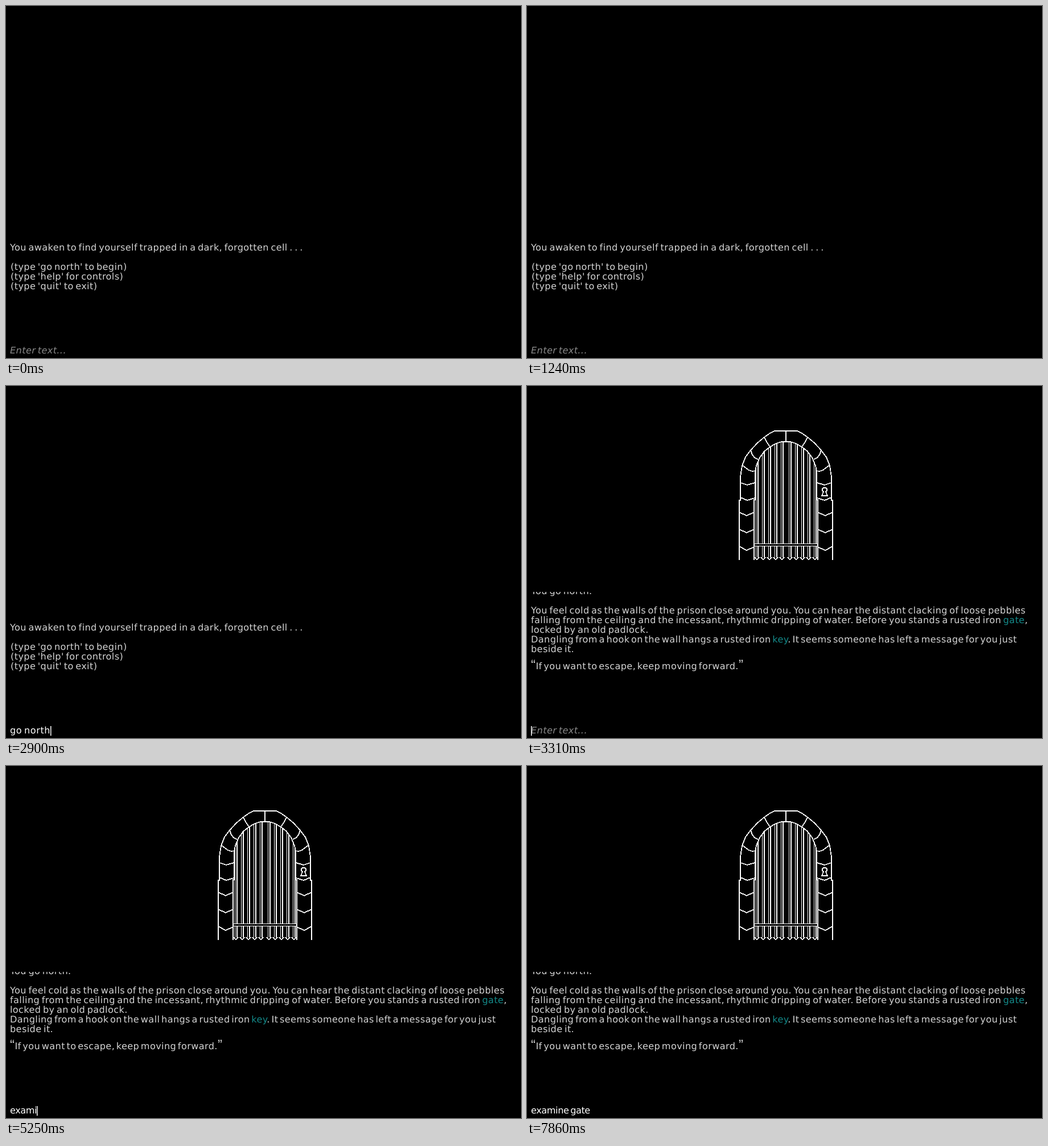
Animation of 905 by 619 pixels, one loop 8 s. Source, as an HTML page:

```html
<!DOCTYPE html>
<html lang="en">
<head>
<meta charset="utf-8">
<title>Text adventure</title>
<style>
  html, body { margin: 0; width: 100%; height: 100%; overflow: hidden; background: #000; }
  svg { display: block; width: 905px; height: 619px; }
  text {
    font: 16.1px "DejaVu Sans", sans-serif;
    letter-spacing: 0.4px;
    word-spacing: -2px;
    fill: #d4d4d4;
    white-space: pre;
    text-rendering: geometricPrecision;
  }
  .link { fill: #148a8a; }
  .quote { font: 24px "Liberation Sans", sans-serif; }
  .tight { word-spacing: -2.85px; }
  #hint { font-style: italic; fill: #8a8a8a; }
  #input { fill: #fff; }
  #door { fill: none; stroke: #fff; stroke-width: 1.8; shape-rendering: crispEdges; }
</style>
</head>
<body>
<svg viewBox="0 0 905 619">
  <defs>
    <clipPath id="pane"><rect y="362" width="905" height="200"/></clipPath>
    <clipPath id="opening">
      <path d="M399 310V200L401 150L403 140L409 126L417 115L427 107L438 101L447 98H463L472 101L483 107L493 115L501 126L507 140L509 150L511 200V310Z"/>
    </clipPath>
    <g id="side">
      <path d="M373 306V201H375V160L378 140L384 125L393 113L405 100L417 90L427 83L435 79H455"/>
      <path d="M399 306V200H401V150L403 140L409 126L417 115L427 107L438 101L447 98H455"/>
      <path d="M417 90L421 98L427 107M393 113L396 121L400 126L406 129M378 139L390 148L396 150L402 149"/>
      <path d="M375 170L387 174L401 170M375 196L387 201L400 197"/>
      <path d="M373 222L386 228L399 222M373 252L386 258L399 252M373 282L386 289L399 283"/>
    </g>
  </defs>

  <g id="intro">
    <text x="7" y="430">You awaken to find yourself trapped in a dark, forgotten cell . . .</text>
    <text x="8" y="464">(type 'go north' to begin)</text>
    <text x="8" y="481">(type 'help' for controls)</text>
    <text x="8" y="498">(type 'quit' to exit)</text>
  </g>

  <g id="room">
    <g id="door">
      <use href="#side"/>
      <use href="#side" transform="translate(910) scale(-1 1)"/>
      <path d="M455 79V98M399 277.5H511M399 281.5H511"/>
      <path id="bars" clip-path="url(#opening)"/>
      <path id="tips"/>
      <path d="M521 186L519 184V181L521 179H525L527 181V184L525 186L528 193H518Z"/>
    </g>
    <g clip-path="url(#pane)">
      <text x="7" y="366">You go north.</text>
      <text x="7" y="400">You feel cold as the walls of the prison close around you. You can hear the distant clacking of loose pebbles</text>
      <text x="7" y="417">falling from the ceiling and the incessant, rhythmic dripping of water. Before you stands a rusted iron <tspan class="link">gate</tspan>,</text>
      <text x="7" y="434">locked by an old padlock.</text>
      <text x="7" y="451" class="tight">Dangling from a hook on the wall hangs a rusted iron <tspan class="link">key</tspan>. It seems someone has left a message for you just</text>
      <text x="7" y="468">beside it.</text>
      <text x="7" y="498" class="tight"><tspan class="quote">“</tspan>If you want to escape, keep moving forward.<tspan class="quote">”</tspan></text>
    </g>
  </g>

  <text id="hint" x="7" y="611">Enter text...</text>
  <text id="input" x="7" y="611"></text>
  <rect id="caret" y="598" width="1.5" height="17" fill="#fff"/>
</svg>
<script>
const LOOP = 8000;
const ENTER = 3310;
const LEFT = 7;
const first = {
  text: 'go north', track: '0.6px',
  keys: [1930, 2060, 2340, 2440, 2620, 2710, 2800, 2900]
};
const second = {
  text: 'examine gate', track: '-0.4px',
  keys: [4610, 4790, 4970, 5070, 5250, 5400, 5480, 5550, 5630, 5710, 5910, 6140]
};
const caretOn = [[1830, 3920], [4510, 6740], [7300, 7860]];

const $ = id => document.getElementById(id);
const show = (el, on) => el.setAttribute('visibility', on ? 'visible' : 'hidden');

// Five spear-tipped bars on each side of the middle gap.
let bars = '', tips = '';
for (const start of [404, 462]) {
  for (let i = 0; i < 5; i++) {
    const x = start + i * 11;
    bars += `M${x - 1.5} 90V277M${x + 2} 90V277M${x - 1.5} 282V301M${x + 2} 282V301`;
    tips += `M${x - 4} 301L${x} 305.5L${x + 4} 301`;
  }
}
$('bars').setAttribute('d', bars);
$('tips').setAttribute('d', tips);

const input = $('input');

function draw(t) {
  const inRoom = t >= ENTER;
  show($('intro'), !inRoom);
  show($('room'), inRoom);

  const entry = inRoom ? second : first;
  const typed = entry.text.slice(0, entry.keys.filter(k => k <= t).length);
  if (input.textContent !== typed) input.textContent = typed;
  input.style.letterSpacing = entry.track;
  show($('hint'), !typed);

  const width = typed ? input.getComputedTextLength() : 0;
  $('caret').setAttribute('x', LEFT + Math.round(width));
  show($('caret'), caretOn.some(([from, to]) => t >= from && t < to));
}

const origin = performance.now();
function tick() {
  draw((performance.now() - origin) % LOOP);
  requestAnimationFrame(tick);
}
tick();
</script>
</body>
</html>
```
